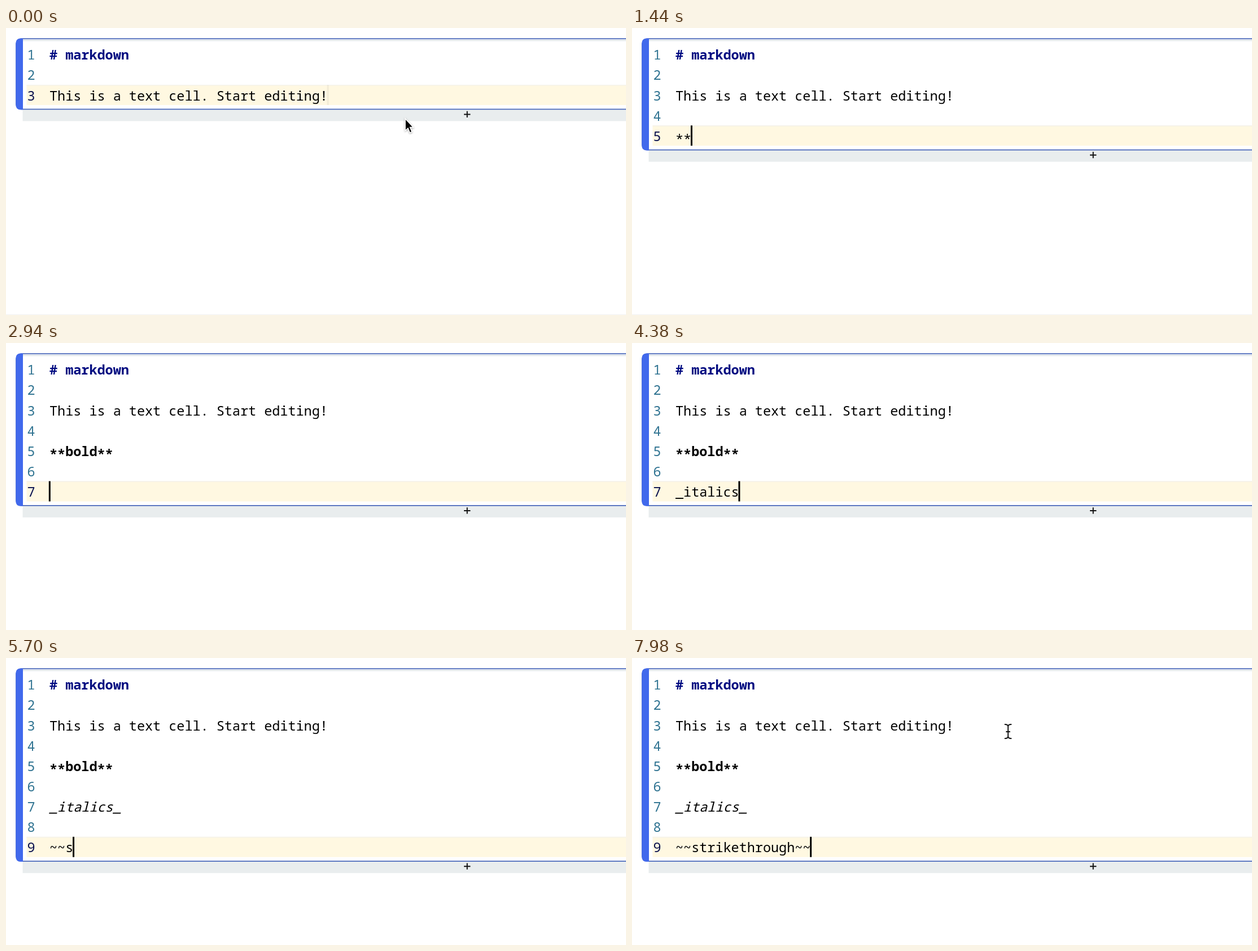
Write an HTML page that moves like this. It is 1098 by 510 pixels and loops after 8 s.

```html
<!DOCTYPE html>
<html lang="en">
<head>
<meta charset="utf-8">
<title>Markdown cell</title>
<style>
html, body { margin: 0; width: 100%; height: 100%; overflow: hidden; background: #fff; }
svg { display: block; width: 1098px; height: 510px; }
text { font: 23.47px "Noto Sans Mono", "DejaVu Sans Mono", monospace; white-space: pre; }
.num { fill: #2f7391; }
.num.on { fill: #0b1250; }
.head { font-weight: 700; fill: #000a80; }
.bold { font-weight: 700; }
.ital { font-style: italic; }
.star { baseline-shift: -5px; }
</style>
</head>
<body>
<svg viewBox="0 0 1098 510">
  <rect width="1098" height="510" fill="#fff"/>
  <rect id="foot" y="508.5" width="1098" height="1.5" fill="#f5f5f5"/>
  <rect id="bar" x="29.5" width="1069" height="21" fill="#e9edee"/>
  <path id="plus" d="M811 0h11.4M816.7-5.6v11.2" stroke="#111" stroke-width="2" fill="none"/>
  <rect id="cell" x="18" y="19.2" width="1100" rx="9" fill="#fff" stroke="#4a68ba" stroke-width="1.7"/>
  <path id="side" fill="#4169ec"/>
  <rect x="30" y="21" width="1068" height="2.2" fill="#dfe6ea"/>
  <rect id="row" x="36.5" width="1062" height="36" fill="#fff8e1"/>
  <rect id="edge" x="36.5" width="1062" height="1.4" fill="#f3f1ea"/>
  <g id="lines"></g>
  <rect id="caret" width="3" height="36" fill="#000"/>
  <g id="arrow" style="filter:drop-shadow(0 1.5px 1.5px rgba(0,0,0,.35))">
    <path d="M0 0V21.5L4.9 17L8.2 25.2L12 23.6L8.6 15.6H14.6Z" fill="#000" stroke="#fff" stroke-width="1.6"/>
  </g>
  <g id="beam" fill="none" stroke-linecap="round">
    <path id="beamHalo" stroke="#fff" stroke-width="4"/>
    <path id="beamInk" stroke="#111" stroke-width="1.9"/>
  </g>
</svg>
<script>
const LOOP = 8000, PITCH = 36.13, TOP = 28.7, LEFT = 77, ADVANCE = 14.08;
const $ = id => document.getElementById(id);
const set = (id, attrs) => { for (const k in attrs) $(id).setAttribute(k, attrs[k]); };
const show = (id, on) => set(id, { visibility: on ? "visible" : "hidden" });

const START = "# markdown\n\nThis is a text cell. Start editing!";
// Each burst: the keys, then the time of every key press.
const bursts = [
  ["\n\n", 660, 900],
  ["**", 1140, 1320],
  ["bold", 1500, 1620, 1740, 1860],
  ["**", 2160, 2340],
  ["\n\n", 2640, 2820],
  ["_", 3240],
  ["italics", 3540, 3600, 3720, 3840, 3900, 4020, 4080],
  ["_", 4440],
  ["\n\n", 4620, 4800],
  ["~~", 5220, 5400],
  ["stri", 5640, 5760, 5880, 5940],
  ["kethr", 6060, 6180, 6240, 6360, 6480],
  ["ough", 6780, 6900, 6960, 7080],
  ["~~", 7320, 7500]
];
const keys = bursts.flatMap(([s, ...at]) => [...s].map((ch, i) => ({ ch, at: at[i] })));

const CLICK = 420, HIDE = 660, RETURN = 7740;
const beamPath = "M-5.5-12.5C-2-12.5 0-11.5 0-8.5V8.5C0 11.5-2 12.5-5.5 12.5" +
  "M5.5-12.5C2-12.5 0-11.5 0-8.5M0 8.5C0 11.5 2 12.5 5.5 12.5M-3 .5H3";
set("beamHalo", { d: beamPath });
set("beamInk", { d: beamPath });

function spans(line) {
  if (line.startsWith("# ")) return [["head", line]];
  if (/^\*\*[^*]+\*\*$/.test(line)) return [["bold", line]];
  if (/^_[^_]+_$/.test(line)) return [["ital", line]];
  if (/^\*\*[^*]+\*$/.test(line)) return [["", "*"], ["ital", line.slice(1)]];
  return [["", line]];
}

// Asterisks sit at mid-height, as in a code font.
const lowerStars = s => s.replace(/\*+/g, '<tspan class="star">$&</tspan>');

function lineMarkup(line, i, last) {
  const y = (TOP + PITCH * i + 27.6).toFixed(2);
  const body = spans(line).map(([c, s]) => `<tspan class="${c}">${lowerStars(s)}</tspan>`).join("");
  return `<text class="num${i === last ? " on" : ""}" x="37.4" y="${y}">${i + 1}</text>` +
    `<text x="${LEFT}" y="${y}">${body}</text>`;
}

let drawn = "";
function drawText(text, lines) {
  if (text === drawn) return;
  drawn = text;
  const last = lines.length - 1;
  const top = TOP + PITCH * last;
  const end = PITCH * lines.length + 36;
  $("lines").innerHTML = lines.map((s, i) => lineMarkup(s, i, last)).join("");
  set("bar", { y: end });
  set("plus", { transform: `translate(0 ${end + 9})` });
  set("cell", { height: end - 19.2 });
  set("side", { d: `M30 18.4H26Q17.4 18.4 17.4 27V${end - 8}Q17.4 ${end + 0.8} 26 ${end + 0.8}H30Z` });
  set("row", { y: top });
  set("edge", { y: top });
  set("caret", { x: LEFT - 1.2 + ADVANCE * lines[last].length, y: top });
}

function drawPointer(t) {
  const p = Math.min(t / CLICK, 1);
  const ease = p * p * (3 - 2 * p);
  const x = 707 - 41 * ease, y = 161 - 30.5 * ease;
  const visible = t < HIDE || t >= RETURN;
  const inside = y < 144;
  show("arrow", visible && !inside);
  show("beam", visible && inside);
  set("arrow", { transform: `translate(${x} ${y})` });
  set("beam", { transform: `translate(${x} ${y})` });
}

function draw(t) {
  const typed = keys.filter(k => k.at <= t);
  const text = START + typed.map(k => k.ch).join("");
  drawText(text, text.split("\n"));
  const touched = typed.length ? typed[typed.length - 1].at : CLICK;
  const lit = t >= touched && Math.floor((t - touched) / 500) % 2 === 0;
  set("caret", { opacity: lit ? 1 : 0.05 });
  show("foot", t < 1700);
  drawPointer(t);
}

function tick(now) {
  draw(now % LOOP);
  requestAnimationFrame(tick);
}
draw(0);
requestAnimationFrame(tick);
</script>
</body>
</html>
```
